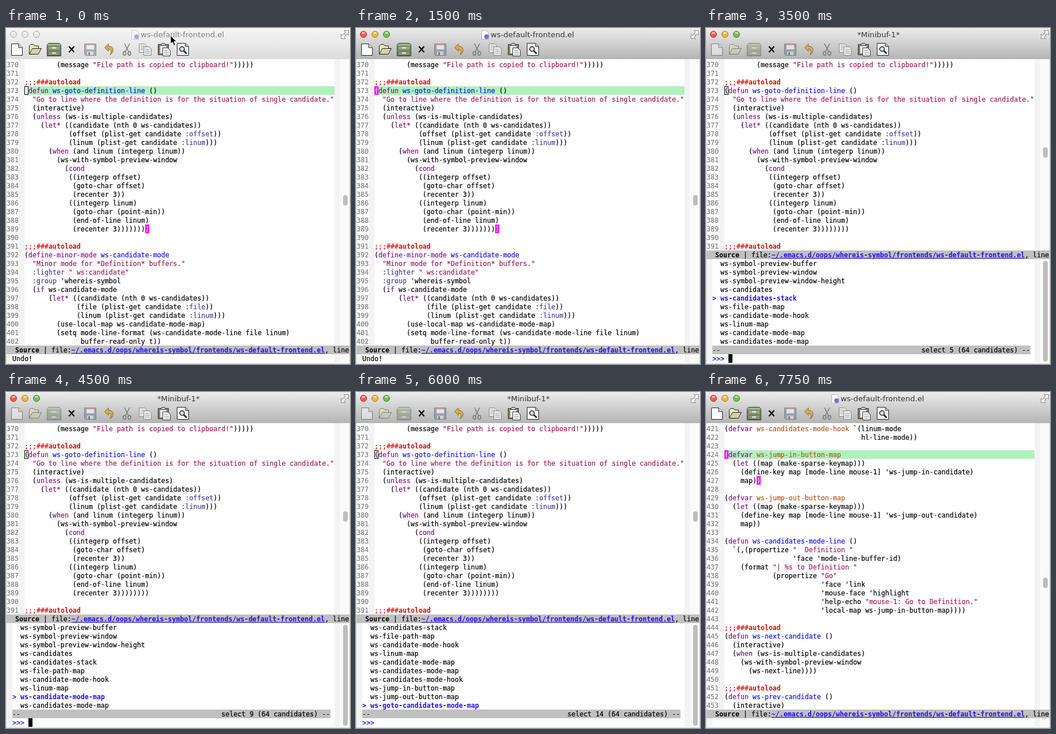
Recreate the animation shown at these times as an HTML page. Size 598x583 px, loop 8 s.

```html
<!DOCTYPE html>
<html lang="en">
<head>
<meta charset="utf-8">
<title>Editor symbol picker</title>
<style>
  html, body { margin: 0; width: 100%; height: 100%; overflow: hidden; background: #fff; }
  #stage { position: relative; width: 598px; height: 583px; overflow: hidden; background: #fff; }
  #stage div, #stage svg { position: absolute; }
  .mono { font: 11.627px/17px "DejaVu Sans Mono", monospace; white-space: pre; color: #000;
    -webkit-text-stroke: .2px; }
  .row { height: 15px; }
  .num { color: #808080; }
  .fringe { background: #f3f3f3; width: 10px; }
  .kw { color: #8a0f8a; }
  .str { color: #a01c5c; }
  .fn { color: #1010f0; }
  .var { color: #b4551f; }
  .key { color: #483d9b; }
  .red { color: #e00a0a; }
  .bold { font-weight: bold; }
  .sel { color: #2010f0; font-weight: bold; }
  .prompt { color: #1515cc; }
  .link { color: #2010f0; font-weight: bold; text-decoration: underline; }
  .bar { background: #c0c0c0; overflow: hidden; }
  .bold, .sel, .link, b { -webkit-text-stroke: 0; }
  .cell { width: 7px; height: 15px; box-sizing: border-box; }
  .match { background: #f0f; color: #fff; }
  .block { background: #000; color: #fff; }
  .hollow { border: 1px solid #000; }
  .thumb { left: 586px; width: 8px; border-radius: 4px; background: #bdbdbd; }
  #title { left: 0; top: 2px; height: 19px; white-space: nowrap;
    font: 13.15px/19px "DejaVu Sans", sans-serif; }
</style>
</head>
<body>
<div id="stage">
  <svg id="chrome" width="598" height="56" viewBox="0 0 598 56" fill="none">
    <defs>
      <linearGradient id="on" x2="0" y2="1"><stop stop-color="#ececec"/><stop offset="1" stop-color="#b4b4b4"/></linearGradient>
      <linearGradient id="off" x2="0" y2="1"><stop stop-color="#f6f6f6"/><stop offset="1" stop-color="#dcdcdc"/></linearGradient>
      <linearGradient id="green" x2="0" y2="1"><stop stop-color="#a9b594"/><stop offset="1" stop-color="#7f8d6c"/></linearGradient>
    </defs>
    <path id="frame" d="M0 54V5Q0 0 5 0H593Q598 0 598 5V54Z"/>
    <g id="lights"></g>
    <g stroke="#8c8c8c" fill="#f4f4f4">
      <path d="M587.500 4.500H595.500V12.500L593 10L590 13L587 10L590 7Z"/>
      <path d="M590.500 18.500H582.500V10.500L585 13L588 10L591 13L588 16Z"/>
    </g>
    <g id="docIcon">
      <path d="M218.500 4.500H227L230.500 8V19.500H218.500Z" fill="#fafaff" stroke="#b4b4c0"/>
      <circle cx="227" cy="15" r="4" fill="#7a72c8"/>
    </g>
    <g id="fileTools" stroke-linejoin="round">
      <path d="M9.500 27.500H22L28.500 34V47.500H9.500Z" fill="#fff" stroke="#222"/>
      <path d="M22 27.500V34H28.500" fill="#ddd" stroke="#222"/>
      <path d="M40.500 45V31L43 28.500H48L50 31H56.500V35" fill="#e6e6c4" stroke="#222"/>
      <path d="M40.500 45.500L46 35.500H61.500L56 45.500Z" fill="#d4d4a8" stroke="#222"/>
      <path d="M71.500 29.500L74 26.500H93L95.500 29.500V48.500H71.500Z" fill="url(#green)" stroke="#2e3626"/>
      <path d="M73.500 31.500H93.500V38.500H73.500ZM73.500 40.500H93.500V47.500H73.500Z" stroke="#5c684c"/>
      <path d="M80 34.500H87M80 43.500H87" stroke="#f0f2e8" stroke-width="2"/>
    </g>
    <path d="M109.500 32L118.500 42M118.500 32L109.500 42" stroke="#000" stroke-width="2.200"/>
    <g opacity=".6">
      <path d="M136.500 27.500H156.500V47.500H138.500L136.500 45.500Z" fill="#7d8b9c" stroke="#48525e"/>
      <path d="M140 28H153V37H140Z" fill="#f5f5f5"/>
      <path d="M140 28H153V30H140Z" fill="#d98070"/>
      <path d="M141 41H152V47H141Z" fill="#ddd"/>
      <path d="M143 42H146V47H143Z" fill="#555"/>
    </g>
    <path d="M171.500 34L178 27.500V31.500Q187 32 186 40Q185 44 181 46.500Q184 41 182 38.500Q180 36.500 178 36.500V40.500Z" fill="#d8ae50" stroke="#80672c"/>
    <g stroke="#777" stroke-width="1.400">
      <path d="M206 27L213 41M215 27L207.500 41"/>
      <ellipse cx="206" cy="44" rx="2.500" ry="3.200"/><ellipse cx="214.500" cy="44" rx="2.500" ry="3.200"/>
    </g>
    <g stroke="#8a8a8a" fill="#e6e6e6">
      <path d="M231.500 27.500H241L244.500 31V42.500H231.500Z"/>
      <path d="M239.500 32.500H249L252.500 36V47.500H239.500Z"/>
      <path d="M234 31.500H240M234 34.500H238M234 37.500H238M242 37.500H249M242 40.500H250M242 43.500H250" stroke="#aaa"/>
    </g>
    <g stroke="#333">
      <path d="M264.500 28.500H282.500V46.500H264.500Z" fill="#8b8062"/>
      <path d="M267.500 30.500H279.500V44.500H267.500Z" fill="#eee" stroke="#777"/>
      <path d="M269.500 30.500V28L272 26.500H275L277.500 28V30.500Z" fill="#ccc"/>
      <path d="M272.500 34.500H281L285.500 39V48.500H272.500Z" fill="#fff"/>
      <path d="M275 39.500H281M275 42.500H283M275 45.500H283" stroke="#888"/>
    </g>
    <g stroke="#222">
      <path d="M297.500 26.500H312L317.500 32V47.500H297.500Z" fill="#f8f8f8"/>
      <path d="M312 27V32H317" fill="#ccc"/>
      <circle cx="306" cy="36.500" r="4" fill="#d5dde5" stroke-width="1.500"/>
      <path d="M309 39.500L314 44.500" stroke-width="2.500"/>
    </g>
  </svg>
  <div id="title"></div>
  <div id="body" class="mono"></div>
  <svg id="mouse" style="left:285px;top:12px" width="14" height="21">
    <path d="M1 1V15.500L4.500 12.500L7 18.500L9.500 17.500L7 11.500H11.500Z" fill="#000" stroke="#fff"/>
  </svg>
</div>
<script>
const LOOP = 8000, ROW = 15, COL = 7, TOP = 56, CODE_X = 32, LINE_Y = 101;
const $ = id => document.getElementById(id);

const definition = `        (message "File path is copied to clipboard!")))))

;;;###autoload
(defun ws-goto-definition-line ()
  "Go to line where the definition is for the situation of single candidate."
  (interactive)
  (unless (ws-is-multiple-candidates)
    (let* ((candidate (nth 0 ws-candidates))
           (offset (plist-get candidate :offset))
           (linum (plist-get candidate :linum)))
      (when (and linum (integerp linum))
        (ws-with-symbol-preview-window
          (cond
           ((integerp offset)
            (goto-char offset)
            (recenter 3))
           ((integerp linum)
            (goto-char (point-min))
            (end-of-line linum)
            (recenter 3))))))))

;;;###autoload
(define-minor-mode ws-candidate-mode
  "Minor mode for *Definition* buffers."
  :lighter " ws:candidate"
  :group 'whereis-symbol
  (if ws-candidate-mode
      (let* ((candidate (nth 0 ws-candidates))
             (file (plist-get candidate :file))
             (linum (plist-get candidate :linum)))
        (use-local-map ws-candidate-mode-map)
        (setq mode-line-format (ws-candidate-mode-line file linum)
              buffer-read-only t))`;

const buttonMap = `(defvar ws-candidates-mode-hook \`(linum-mode
                                  hl-line-mode))

(defvar ws-jump-in-button-map
  (let ((map (make-sparse-keymap)))
    (define-key map [mode-line mouse-1] 'ws-jump-in-candidate)
    map))

(defvar ws-jump-out-button-map
  (let ((map (make-sparse-keymap)))
    (define-key map [mode-line mouse-1] 'ws-jump-out-candidate)
    map))

(defun ws-candidates-mode-line ()
  \`(,(propertize "  Definition "
                 'face 'mode-line-buffer-id)
    (format "| %s to Definition "
            (propertize "Go"
                        'face 'link
                        'mouse-face 'highlight
                        'help-echo "mouse-1: Go to Definition."
                        'local-map ws-jump-in-button-map))))

;;;###autoload
(defun ws-next-candidate ()
  (interactive)
  (when (ws-is-multiple-candidates)
    (ws-with-symbol-preview-window
      (ws-next-line))))

;;;###autoload
(defun ws-prev-candidate ()
  (interactive)`;

const views = {
  definition: { text: definition, first: 370, close: [30, 19] },
  buttonMap: { text: buttonMap, first: 421, close: [8, 6] },
};

const symbols = ['symbol-preview-buffer', 'symbol-preview-window', 'symbol-preview-window-height',
  'candidates', 'candidates-stack', 'file-path-map', 'candidate-mode-hook', 'linum-map',
  'candidate-mode-map', 'candidates-mode-map', 'candidates-mode-hook', 'jump-in-button-map',
  'jump-out-button-map', 'goto-candidates-mode-map'].map(s => 'ws-' + s);

// Each step lists only what differs from the step before it.
const FILE = 'ws-default-frontend.el';
const steps = [
  [0, { view: 'definition', active: false, title: FILE, tools: 1, mouse: true, point: 'hollow',
        mark: true, sel: 0, top: 1, echo: 'Undo!', caret: '', thumb: 290, short: false }],
  [500, { active: true, point: 'match' }],
  [1000, { mouse: false, point: 'block' }],
  [1500, { point: 'match' }],
  [2000, { title: '*Minibuf-1*', tools: .45, point: 'hollow', echo: '>>>' }],
  [2250, { mark: false, sel: 1, caret: 'block', thumb: 207 }],
  [2750, { caret: '' }],
  [3000, { sel: 2, caret: 'block' }],
  [3250, { sel: 3 }],
  [3500, { sel: 5 }],
  [4000, { sel: 7 }],
  [4250, { sel: 8 }],
  [4500, { sel: 9 }],
  [4750, { sel: 10 }],
  [5000, { sel: 11, top: 2 }],
  [5250, { sel: 13, top: 4 }],
  [5500, { sel: 14, top: 5 }],
  [6000, { caret: '' }],
  [6500, { sel: 12, caret: 'block' }],
  [7000, { title: FILE, tools: 1, caret: 'start', thumb: 322, short: true }],
  [7250, { view: 'buttonMap', mark: true, sel: 0, echo: '', caret: '', point: 'block', short: false }],
  [7750, { point: 'match' }],
];

const syntax = /(?<str>"[^"]*")|(?<red>;;;###)|(?<auto>autoload)|(?<kw>(?<=\()(?:defun|defvar|define-minor-mode|unless|let\*?|when|cond|if)(?=\s|$))|(?<fn>(?<=(?:defun|minor-mode) )[\w-]+)|(?<var>(?<=defvar )[\w-]+)|(?<key>:[a-z]+)/g;

function highlight(line) {
  return line.replace(syntax, (text, ...rest) => {
    const groups = rest.at(-1);
    const kind = Object.keys(groups).find(k => groups[k]);
    return `<span class="${kind === 'auto' ? 'red bold' : kind}">${text}</span>`;
  });
}

const box = (cls, x, y, w, h, text = '', style = '') =>
  `<div class="${cls}" style="left:${x}px;top:${y}px;width:${w}px;height:${h}px;${style}">${text}</div>`;
const row = (cls, x, y, text) => `<div class="row ${cls}" style="left:${x}px;top:${y}px">${text}</div>`;
const cell = (cls, x, y, text = '') => box('cell ' + cls, x, y, COL, ROW, text);

function codeWindow(s, bottom) {
  const { text, first, close } = views[s.view];
  let html = box('fringe', 22, 54, 10, bottom - 54) + box('fringe', 571, 54, 10, bottom - 54);
  if (s.mark) html += box('', CODE_X, LINE_Y, 539, ROW, '', 'background:#aef2bd');
  text.split('\n').slice(0, (bottom - TOP) / ROW).forEach((line, i) => {
    const y = TOP + i * ROW;
    html += row('num', 1, y, first + i) + row('', CODE_X, y, highlight(line));
  });
  if (s.mark) html += cell('match', CODE_X + close[0] * COL, TOP + close[1] * ROW, ')');
  if (s.point === 'hollow') {
    html += s.mark ? box('cell hollow', CODE_X, LINE_Y, COL, ROW, '', 'background:#fff')
                   : cell('hollow', CODE_X, LINE_Y);
  } else html += cell(s.point, CODE_X, LINE_Y, '(');
  return html;
}

function modeLine(s, y) {
  const path = '~/.emacs.d/oops/whereis-symbol/frontends/' + FILE;
  const text = `<b>  Source</b> | file:<span class="link">${path}</span>, line`;
  return box('bar', 1, y, s.short ? 581 : 596, ROW, row('', 1, 0, text));
}

function picker(s) {
  let html = '';
  for (let i = 0; i < 10; i++) {
    const n = s.top + i, on = n === s.sel;
    html += row(on ? 'sel' : '', 11, 401 + i * ROW, (on ? '&gt; ' : '  ') + symbols[n - 1]);
  }
  const status = `select ${s.sel} (64 candidates) --`;
  return html + box('bar', 11, 551, 553, ROW, '--' + status.padStart(77)) + box('thumb', 586, 404, 8, 175);
}

function echoArea(s) {
  const isPrompt = s.echo.startsWith('>');
  let html = row(isPrompt ? 'prompt' : '', 11, 566, s.echo.replace(/>/g, '&gt;'));
  if (s.caret === 'block') html += cell('block', 39, 566);
  if (s.caret === 'start') {
    html += box('', 11, 566, 7, 15, '', 'background:#fff') +
      box('', 12, 567, 5, 2, '', 'background:#000') + box('', 15, 567, 2, 13, '', 'background:#000');
  }
  return html;
}

function drawChrome(s) {
  $('frame').setAttribute('fill', `url(#${s.active ? 'on' : 'off'})`);
  const colors = s.active ? ['#ee5a50', '#f2b53c', '#74bd4c'] : ['#e6e6e6', '#e6e6e6', '#e6e6e6'];
  const rims = s.active ? ['#a83c36', '#a87a28', '#4c8430'] : ['#aaa', '#aaa', '#aaa'];
  $('lights').innerHTML = colors.map((c, i) =>
    `<circle cx="${13 + i * 20}" cy="11" r="5.5" fill="${c}" stroke="${rims[i]}"/>` +
    `<ellipse cx="${13 + i * 20}" cy="8.500" rx="3" ry="1.800" fill="#fff" opacity=".55"/>`).join('');
  const isFile = s.title === FILE;
  $('docIcon').style.display = isFile ? '' : 'none';
  $('docIcon').style.opacity = s.active ? 1 : .6;
  $('fileTools').style.opacity = s.tools;
  $('title').textContent = s.title;
  $('title').style.left = (isFile ? 234 : 263) + 'px';
  $('title').style.color = s.active ? '#333' : '#808080';
  $('mouse').style.display = s.mouse ? '' : 'none';
}

function draw(s) {
  drawChrome(s);
  const bottom = s.sel ? 386 : 551, below = bottom + ROW;
  $('body').innerHTML =
    box('', 582, 54, 16, 527, '', 'background:#fafafa') +
    box('fringe', 1, below, 10, 581 - below) + box('fringe', 571, below, 10, 581 - below) +
    codeWindow(s, bottom) + box('thumb', 586, s.thumb, 8, 18) + modeLine(s, bottom) +
    (s.sel ? picker(s) : '') + echoArea(s) +
    box('', 0, 54, 1, 529, '', 'background:#d8d8d8') + box('', 597, 54, 1, 529, '', 'background:#d8d8d8') +
    box('', 0, 582, 598, 1, '', 'background:#d0d0d0');
}

let shown = -1;
const start = performance.now();
function tick() {
  const t = (performance.now() - start) % LOOP;
  const index = steps.findLastIndex(([at]) => at <= t);
  if (index !== shown) {
    draw(Object.assign({}, ...steps.slice(0, index + 1).map(([, change]) => change)));
    shown = index;
  }
  requestAnimationFrame(tick);
}
tick();
</script>
</body>
</html>
```
